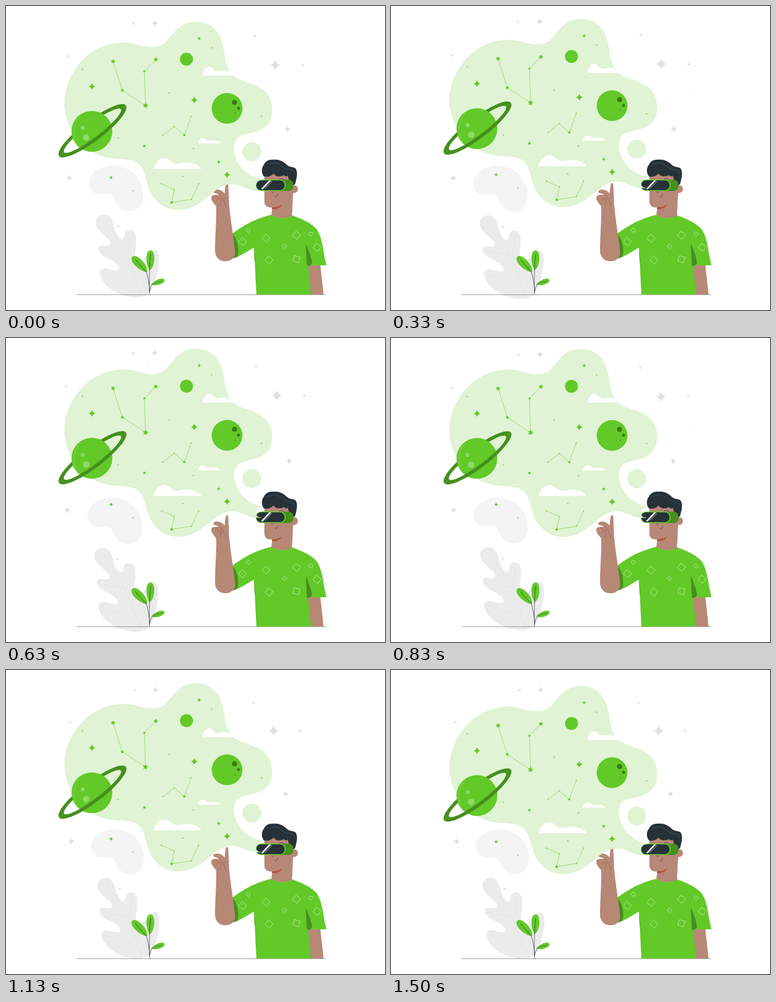
Recreate the animation shown at these times as an HTML page. Size 660x530 px, loop 1.54 s.

```html
<!DOCTYPE html>
<html lang="en">
<head>
<meta charset="utf-8">
<title>Virtual sky</title>
<style>
html, body { margin: 0; width: 100%; height: 100%; overflow: hidden; background: #fff; }
svg { display: block; width: 660px; height: 530px; }
.g { fill: #62c928; }
.d { fill: #458f1d; }
.skin { fill: #b78876; }
.ink { fill: #263238; }
.glow { fill: #8fdb64; }
.w { fill: #fff; }
.pale { fill: #e0f3d4; stroke: #cdebbb; stroke-width: .5; }
.line { fill: none; stroke-linecap: round; stroke-linejoin: round; stroke-width: .7; }
</style>
</head>
<body>
<svg viewBox="0 0 660 530">
  <defs>
    <path id="star4" d="M0-1Q.22-.22 1 0Q.22.22 0 1Q-.22.22-1 0Q-.22-.22 0-1Z"/>
    <path id="star5"/>
    <circle id="dot" r="1"/>
    <rect id="square" x="-.5" y="-.5" width="1" height="1" vector-effect="non-scaling-stroke"/>
    <path id="cloud" d="M0 0C2-10 9-19 19-19C27-19 31-10 40-9C47-9 49-11 58-11C69-11 81-6 83 0Z"/>
    <path id="half" d="M-73 0A73 18 0 0 0 73 0H62A62 12 0 0 1-62 0Z"/>
    <g id="leaf">
      <path class="g" d="M0 0C-7-9-8-34 2-34C12-33 9-2 0 0Z"/>
      <path class="line" stroke="#263238" d="M0 0Q0-14 2-27"/>
    </g>
  </defs>

  <g id="backdrop">
    <path fill="#f4f4f4" d="M187 278C212 276 240 297 240 326C241 345 230 357 215 356C198 355 194 343 188 331C184 323 175 328 166 327C154 327 148 318 148 308C149 290 166 279 187 278Z"/>
    <path fill="#ebebeb" d="M174 362C184 362 188 372 191 383C193 394 201 405 205 404C210 401 205 388 218 388C230 389 228 403 228 412C227 428 224 438 228 444C236 452 246 424 260 422C270 424 268 445 264 462C260 482 254 498 240 502C220 507 196 498 182 487C172 479 163 464 167 457C173 449 188 459 197 457C204 452 190 440 180 437C170 433 161 424 164 417C168 411 180 419 184 413C187 406 172 397 165 389C155 378 158 363 174 362Z"/>
    <path class="line" stroke="#e0e0e0" d="M176 374C196 400 218 440 237 502M167 422L214 431M171 462L228 480M220 397L214 431M262 432Q246 460 235 494"/>
    <g id="greyStars" fill="#e0e0e0"></g>
  </g>

  <path fill="none" stroke="#263238" stroke-width=".5" d="M123 503.3H557"/>

  <path class="line" stroke="#263238" d="M250 503Q249 480 250 458M250 497Q249 478 244 462M250 499Q251 490 256 483"/>
  <use href="#leaf" transform="translate(250 460)"/>
  <use href="#leaf" transform="translate(245 464) rotate(-46) scale(1.08)"/>
  <use href="#leaf" transform="translate(254 485) rotate(68) scale(.68)"/>

  <g id="man">
    <path class="skin" d="M522 448H547L553 503H529Z"/>
    <path class="g" d="M462 364C470 371 490 371 498 365C513 370 531 378 540 388C549 399 552 420 554 434L558 452H526L531 503H436L432 421C420 428 410 435 396 440C398 425 396 408 394 397C410 385 430 372 462 364Z"/>
    <path class="d" d="M522 414C526 424 531 436 533 447C532 452 528 454 524 453ZM394 397C402 404 407 424 403 437L396 440ZM431 408L434 446H433Z"/>
    <g id="squares" class="line" stroke="#d8f3c8"></g>
    <path class="skin" d="M366 345C367 370 364 400 364 428C365 440 374 446 384 445C394 444 400 437 399 429C397 405 391 375 389 350Z"/>
    <path class="skin" d="M366 349C360 342 356 337 358 332C361 328 367 330 371 329C367 326 362 327 361 324C361 320 368 319 373 321C378 323 380 326 381 327C381 320 382 314 383 311C384 308 387 308 387 312C388 325 388 340 389 352L388 360L366 355Z"/>
    <path class="line" stroke="#9f5340" d="M371 329C377 331 380 340 383 349M365 331C371 333 371 339 367 339M373 334C376 341 373 345 373 348"/>
    <path class="skin" d="M450 292V341C450 349 456 352 464 351L462 364C468 371 492 371 498 366L500 326C512 327 510 310 501 313L503 290Z"/>
    <path fill="#b0563d" d="M463 351C470 351 476 349 481 346C478 352 471 355 463 354Z"/>
    <path class="line" stroke="#263238" d="M468 332C470 333 473 332 473 328M462 324Q464 326 466 324M475 302Q480 299 484 303"/>
    <path class="ink" d="M449 297C444 291 445 281 449 277C452 270 459 267 467 268C476 267 484 272 489 277C495 282 500 280 504 283C508 287 507 297 505 304C504 309 503 313 500 312C497 308 492 305 491 296C488 298 486 297 484 295C478 298 469 298 466 292C462 297 454 299 449 297Z"/>
    <path class="line" stroke="#4d5e67" d="M455 277C468 269 480 277 486 284M484 282C492 287 500 283 503 292"/>
    <rect class="d" x="462" y="303" width="38.500" height="19.500" rx="8"/>
    <rect class="g" x="435" y="302.500" width="52" height="20" rx="9"/>
    <rect class="ink" x="436" y="304" width="49" height="17" rx="8"/>
    <path fill="#e8eaea" d="M444 319L447 320L462 304H458Z"/>
    <path class="line" stroke="#e8eaea" d="M451 318L463 306"/>
  </g>

  <g id="dream">
    <path class="pale" d="M330 28C362 28 375 50 379 78C382 100 385 116 405 128C425 137 463 140 463 181C463 222 425 218 408 226C392 235 394 257 404 274C413 289 428 300 447 303C439 303 435 308 435 313C435 318 438 322 444 322C425 322 417 317 408 313C395 308 383 310 371 317C350 331 333 355 298 355C273 354 255 338 247 312C241 290 238 272 216 268C201 265 181 268 158 258C125 243 102 205 102 168C102 140 118 104 148 82C170 67 195 62 217 65C237 69 257 78 274 67C290 55 298 28 330 28Z"/>
    <circle class="pale" cx="428" cy="254" r="16"/>
    <g class="w">
      <use href="#cloud" transform="translate(342 121.500) scale(.65 .83)"/>
      <use href="#cloud" transform="translate(334 239.500) scale(.47)"/>
      <use href="#cloud" transform="translate(257 284)"/>
    </g>
    <g id="lines" class="line" stroke="#7dd04c"></g>
    <g id="greenStars" class="g"></g>
    <circle class="g" cx="314.300" cy="92.800" r="11.300"/>
    <circle class="g" cx="385" cy="178.500" r="26.800"/>
    <g fill="#397817"><circle cx="398" cy="168" r="4.400"/><circle cx="405" cy="178" r="2.600"/><circle cx="399" cy="187" r="1"/></g>
    <g transform="translate(150.600 217.500)">
      <use href="#half" class="d" transform="rotate(-37.200) scale(1 -1)"/>
      <circle class="g" cx="-1" cy="1" r="35.600"/>
      <circle class="glow" cx="-17" cy="-5" r="3.500"/>
      <circle class="glow" cx="-11" cy="12" r="5.700"/>
      <path class="line" stroke="#8fdb64" d="M-21-25C-35-14-35 11-26 25"/>
      <use href="#half" class="d" transform="rotate(-37.200)"/>
    </g>
  </g>
</svg>
<script>
const el = id => document.getElementById(id);

// Puts one shape at every "x y" of a comma separated list
function scatter(id, shape, size, points, turn = 0) {
  el(id).innerHTML += points.split(',').map(p =>
    `<use href="#${shape}" transform="translate(${p}) rotate(${turn}) scale(${size})"/>`).join('');
}

function constellation(points, ...sizes) {
  el('lines').innerHTML += `<polyline points="${points}"/>`;
  points.split(',').forEach((p, i) => {
    const size = sizes[i] || 1;
    scatter('greenStars', size > 1 ? 'star5' : 'dot', size, p, 10);
  });
}

el('star5').setAttribute('d', 'M' + Array.from({ length: 10 }, (_, i) => {
  const r = i % 2 ? .5 : 1, a = i * Math.PI / 5;
  return [r * Math.sin(a), -r * Math.cos(a)];
}).join('L') + 'Z');

scatter('greyStars', 'star4', 9, '466 106');
scatter('greyStars', 'star4', 5.6, '260.5 34.5,487 216,114 299');
scatter('greyStars', 'star4', 3, '431 57');
scatter('greyStars', 'star4', 3, '224 35,112 91,512.5 106,198 381.5', 45);
scatter('greyStars', 'dot', .8, '250 53,514 159');

constellation('186.5 96.5,202.5 147,243 173.5,241 114,261 93.5', 4.3, 3.4, 5.2, 2.5, 4.3);
constellation('273.5 225,293 210,310.5 225,322.5 192', 1, 1, 2.8);
constellation('270.5 310,293 320,288.5 342.5,323 337,335.5 310', 1, 1, 3.2);
scatter('greenStars', 'star4', 6, '149.7 140.3,328 164,385 294.2');
scatter('greenStars', 'star4', 3.2, '336.4 56.7,370.5 271.8,183 299');
scatter('greenStars', 'star4', 3.2, '241 244', 45);
scatter('greenStars', 'dot', 1, '358 73,133 110.5,284 151.5,195.5 230,326.5 248.5,308 297.5,445 192.5,221 322');

scatter('squares', 'square', 10, '412 411,453 405,458 443,506 400,542 421', 38);
scatter('squares', 'square', 10, '506 441.5', 15);
scatter('squares', 'square', 5.5, '422 391,485 419,531 397.5', 38);

const LOOP = 1540, STEP = 1000 / 24;
const beat = (q, from, peak, to) => Math.max(0, Math.min((q - from) / (peak - from), (to - q) / (to - peak)));

function draw(now) {
  const t = now % LOOP;
  const n = Math.floor((Math.floor(t / 10) * 10 + 4.9) / STEP); // 24 poses per second
  const q = Math.min(1, (n + .7) / 36);
  const lift = 10.6 * (1 - Math.abs(2 * q - 1));
  const scale = 1 + .1 * (beat(q, 0, .1, .3) + beat(q, .4, .5, .6));
  el('dream').setAttribute('transform', `translate(0 ${.41 - lift})`);
  el('backdrop').setAttribute('transform', `translate(311.5 266.5) scale(${scale}) translate(-311.5 -266.5)`);
}

const start = performance.now();
function tick() {
  draw(performance.now() - start);
  requestAnimationFrame(tick);
}
tick();
</script>
</body>
</html>
```
